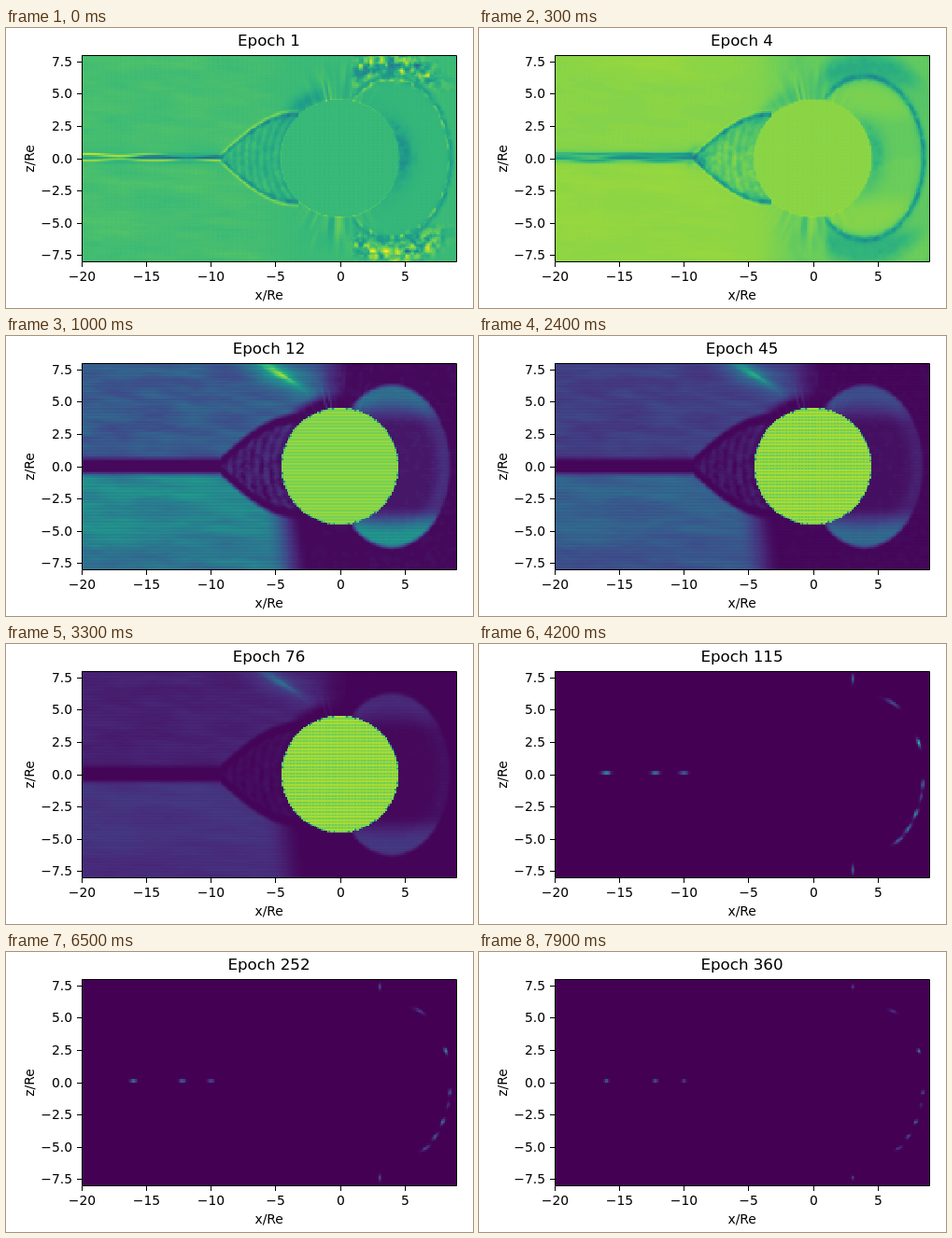
Recreate the animation shown at these times as an HTML page with a canvas. Size 500x300 px, loop 8 s.

```html
<!DOCTYPE html>
<html>
<head>
<meta charset="utf-8">
<style>
html, body { margin: 0; width: 100%; height: 100%; overflow: hidden; background: #fff; }
#heat { position: absolute; left: 81px; top: 29px; width: 401px; height: 221px; image-rendering: pixelated; }
svg { position: absolute; left: 0; top: 0; }
text { font: 13.89px "DejaVu Sans", Verdana, sans-serif; fill: #000; text-anchor: middle; }
#title { font-size: 16.67px; }
.end { text-anchor: end; }
path { stroke: #000; fill: none; }
</style>
</head>
<body>
<canvas id="heat" width="232" height="128"></canvas>
<svg id="axes" width="500" height="300">
  <path d="M81.5 29.5H482.5V250.5H81.5Z"/>
  <text id="title" x="281.5" y="19"></text>
  <text x="281.7" y="291">x/Re</text>
  <text transform="translate(30 140) rotate(-90)">z/Re</text>
</svg>
<script>
const W = 232, H = 128, CELLS = 8, RADIUS = 4.55;
const heat = document.getElementById('heat').getContext('2d');
const axes = document.getElementById('axes');
const title = document.getElementById('title');

// Axis ticks
const label = n => String(n).replace('-', '\u2212');
let ticks = '';
for (let x = -20; x <= 5; x += 5) {
  const px = Math.floor(81.5 + (x + 20) * 13.83) + 0.5;
  ticks += `<path d="M${px} 251v5"/><text x="${px}" y="271">${label(x)}</text>`;
}
for (let z = -7.5; z <= 7.5; z += 2.5) {
  const py = Math.floor(250.5 - (z + 8) * 13.81) + 0.5;
  ticks += `<path d="M81 ${py}h-5"/><text class="end" x="71" y="${py + 4.5}">${label(z.toFixed(1))}</text>`;
}
axes.insertAdjacentHTML('beforeend', ticks);

// Viridis lookup
const stops = ['440154', '482878', '3e4989', '31688e', '26828e', '1f9e89', '35b779', '6ece58', 'b5de2b', 'fde725']
  .map(h => [0, 2, 4].map(i => parseInt(h.substr(i, 2), 16)));
const viridis = Array.from({ length: 256 }, (_, i) => {
  const p = i / 255 * 9, k = Math.min(8, Math.floor(p));
  return stops[k].map((c, j) => c + (stops[k + 1][j] - c) * (p - k));
});

const clamp = v => Math.max(0, Math.min(1, v));
const bump = (d, width) => Math.exp(-d * d / (width * width));
const ramp = (from, to, v) => {
  const t = clamp((v - from) / (to - from));
  return t * t * (3 - 2 * t);
};
const hash = (i, j) => {
  const s = Math.sin(i * 127.1 + j * 311.7) * 43758.5453;
  return 2 * (s - Math.floor(s)) - 1;
};
// Smooth noise between -1 and 1
function noise(x, y) {
  const i = Math.floor(x), j = Math.floor(y), u = ramp(0, 1, x - i), v = ramp(0, 1, y - j);
  const row = k => hash(i, k) * (1 - u) + hash(i + 1, k) * u;
  return row(j) * (1 - v) + row(j + 1) * v;
}

// Shared geometry of the magnetosphere at every cell
const points = Array.from({ length: W * H }, (_, i) => {
  const col = i % W, row = Math.floor(i / W);
  const x = (col + 0.5) / CELLS - 20, z = 8 - (row + 0.5) / CELLS;
  const side = Math.abs(z), r = Math.hypot(x, z), angle = Math.atan2(z, x);
  const rough = noise(x * 2.5, z * 2.5) + 0.5 * noise(x * 5, z * 5);
  const flow = noise(x * 0.35, z * 1.6 + x * 0.12) + 0.5 * noise(x * 0.9, z * 5);
  const rim = 4.5 * (Math.hypot((x - 4) / 4.55, z / 6.3) - 1);
  const day = ramp(0.6, 1.4, x);
  const tail = ramp(-8.8, -9.6, x);
  const arch = side - 3.4 * Math.sin(Math.PI / 2 * clamp((x + 9.3) / 5.9));
  const bow = x < -3.2 ? 1 - tail : 0;
  return {
    col, row, x, z, side, r, angle, rough, flow, rim, day, tail, arch, bow,
    wave: 0.06 * Math.sin(x * 1.2),
    west: ramp(-3, -8, x),
    inner: bow * ramp(0.1, -0.3, arch),
    lens: day * ramp(0.15, -0.2, rim),
    cusp: day * ramp(4.8, 6.8, side) * bump(rim - 0.7, 0.8),
    rays: noise(angle * 25, r * 0.4) * bump(x + 0.2, 2) * ramp(8, 5.5, r)
  };
});
const field = f => Float32Array.from(points, f);
const dot = p => p.col % 3 || p.row % 2 ? 0 : 1;

const signed = field(p => {
  const { x, z, r, rim, arch, rough, wave } = p;
  if (r < RADIUS) return 0.674 - 0.015 * dot(p);
  let v = 0.68 + p.west * (0.02 + 0.015 * p.flow) - 0.015 * p.lens - 0.01 * dot(p);
  v += 0.08 * bump(r - RADIUS, 0.08) + 0.09 * p.rays;
  v -= 0.14 * p.lens * bump(r - 4.9, 0.8) * bump(z - 0.3, 2.6) * (1 + 0.4 * rough);
  v -= 0.13 * bump(r - 5.1, 0.6) * bump(p.angle - 2.15, 0.3);
  v -= p.day * bump(rim, 0.2) * (0.12 + 0.08 * rough);
  v += 0.25 * p.day * bump(rim + 0.12, 0.12) * clamp(rough + 0.3);
  v += 0.28 * p.cusp * rough;
  v += p.bow * (0.13 * bump(arch - 0.25, 0.13) - (0.16 + 0.1 * rough) * bump(arch, 0.18));
  v -= p.inner * (0.05 + 0.03 * Math.sin(r * 11) + 0.03 * rough);
  v += p.tail * (0.26 * bump(z - 0.25 - wave, 0.1) * ramp(-12, -17, x) + 0.22 * bump(z + 0.12 + wave, 0.11)
    - 0.1 * bump(z, 0.35) - 0.28 * bump(z - 0.06 - wave, 0.1) * ramp(-17, -15, x));
  return v;
});

const inverted = field(p => {
  const { x, z, r, side, rim, arch, rough, wave } = p;
  if (r < RADIUS) return 0.97 - 0.008 * dot(p);
  const upper = ramp(-0.3, 0.5, z);
  let v = 0.967 - 0.03 * upper + 0.035 * upper * ramp(5.5, 6.5, z) * bump(x + 12, 5);
  const east = ramp(-4, 0.5, x + side * 0.1);
  v -= east * (1 - p.lens) * (0.13 + 0.035 * noise(rim * 2, side * 0.4));
  v -= p.lens * (0.09 - 0.08 * ramp(2.2, 4.2, side) + 0.05 * bump(r - 4.8, 0.8) * ramp(4, 2, side));
  v += 0.05 * p.rays;
  v -= p.day * (bump(rim, 0.17) * (0.27 + 0.12 * rough) + 0.07 * bump(rim - 0.1, 0.5));
  v -= p.cusp * (0.22 + 0.24 * rough);
  v -= p.bow * (bump(arch, 0.2) * (0.3 + 0.1 * rough) + 0.09 * bump(arch + 0.3, 0.6));
  v -= p.inner * (0.08 + 0.03 * Math.sin(r * 9) + 0.05 * rough);
  v -= bump(Math.hypot(x + 8.8, z), 0.8) * (0.2 + 0.2 * rough);
  v -= p.tail * (0.36 * bump(z - 0.3 - wave / 2, 0.14) + 0.36 * bump(z + 0.12 - wave, 0.16) + 0.17 * bump(z - 0.1, 0.4));
  return v;
});

// Dark field: gain scales the lobes, core is the level of the disc
const lobes = (gain, core, grid) => field(p => {
  const { x, z, r, side, rim, arch, flow, row, col } = p;
  if (r < RADIUS - 0.1) return core * (row % 2 ? (grid && col % 2 ? 0.9 : 0.95) : 1.01);
  if (r < RADIUS) return core * ((col + row) % 3 ? 0.9 : 0.55);
  const outer = ramp(0.35, 0.9, arch);
  const slant = 0.86 * (z - 7.2 + 0.6 * (x + 4.7));
  let v = 0.02 + 0.02 * clamp(p.rough) * ramp(-4, 0, x);
  if (z > 0) {
    v += outer * ramp(1, -2.5, x) * ramp(5, 6, r) * (0.26 + 0.05 * flow + 0.17 * bump(slant, 1.4) * bump(x + 5, 3.5));
    v += 0.12 * clamp(p.rays);
  } else {
    v += outer * ramp(-2.3, -5.5, x + 0.15 * (z + 8)) * (0.44 + 0.05 * flow - 0.08 * ramp(-4, -8, z));
  }
  v += p.inner * (0.06 + 0.04 * p.rough + 0.03 * Math.sin(r * 9));
  v += p.lens * (0.04 + 0.07 * bump(rim + 0.4, 0.7) + (z > 0 ? 0.22 : 0.38) * ramp(3, 5.4, side));
  v = v * gain * (row % 2 ? 1.04 : 0.95);
  const streak = bump(slant, 0.45) * bump(x + 4.7, 1.7) * (1 + 0.5 * noise(slant * 5, x * 0.5));
  return v + 0.28 * Math.sqrt(gain) * streak * ramp(5, 6, r);
});

// Residual specks on the boundary, the tail sheet and the cusps, fainter along each list
const rimSpecks = [2.4, -3.1, -4.2, -0.8, -5.1, 5.5, -1.8];
const tailSpecks = [-16, -12.2, -10];
const residual = (level, size) => field(({ x, z, rim, side }) => {
  const sum = (list, at) => list.reduce((s, c, k) => s + bump(at - c, size) / (1 + 0.3 * k), 0);
  const edge = x > 4 ? bump(rim, 0.1) * sum(rimSpecks, z) : 0;
  const sheet = bump(z - 0.12, 0.1) * sum(tailSpecks, x);
  const cusps = 0.5 * bump(x - 3.1, 0.1) * bump(side - 7.4, size);
  return level * (edge + sheet + cusps);
});

// Steps of 100 ms
const keys = [
  [0, signed], [6, inverted], [10, lobes(1, 0.83, false)], [24, lobes(0.66, 0.86, true)],
  [34, lobes(0.28, 0.86, true)], [39, lobes(0.04, 0.16, true)],
  [42, residual(0.65, 0.3)], [65, residual(0.5, 0.22)], [79, residual(0.42, 0.15)]
];

const image = heat.createImageData(W, H);
function show(step) {
  const k = Math.max(1, keys.findIndex(key => key[0] >= step));
  const [t0, a] = keys[k - 1], [t1, b] = keys[k], u = (step - t0) / (t1 - t0);
  for (let i = 0; i < W * H; i++) {
    const [red, green, blue] = viridis[Math.round(clamp(a[i] + (b[i] - a[i]) * u) * 255)];
    image.data.set([red, green, blue, 255], i * 4);
  }
  heat.putImageData(image, 0, 0);
  const epoch = Math.max(step + 1, Math.round(1 + 0.65 * step + 0.0493 * step * step));
  title.textContent = 'Epoch ' + epoch;
}

let shown = -1;
function tick() {
  const step = Math.floor(performance.now() % 8000 / 100);
  if (step !== shown) show(shown = step);
  requestAnimationFrame(tick);
}
tick();
</script>
</body>
</html>
```
